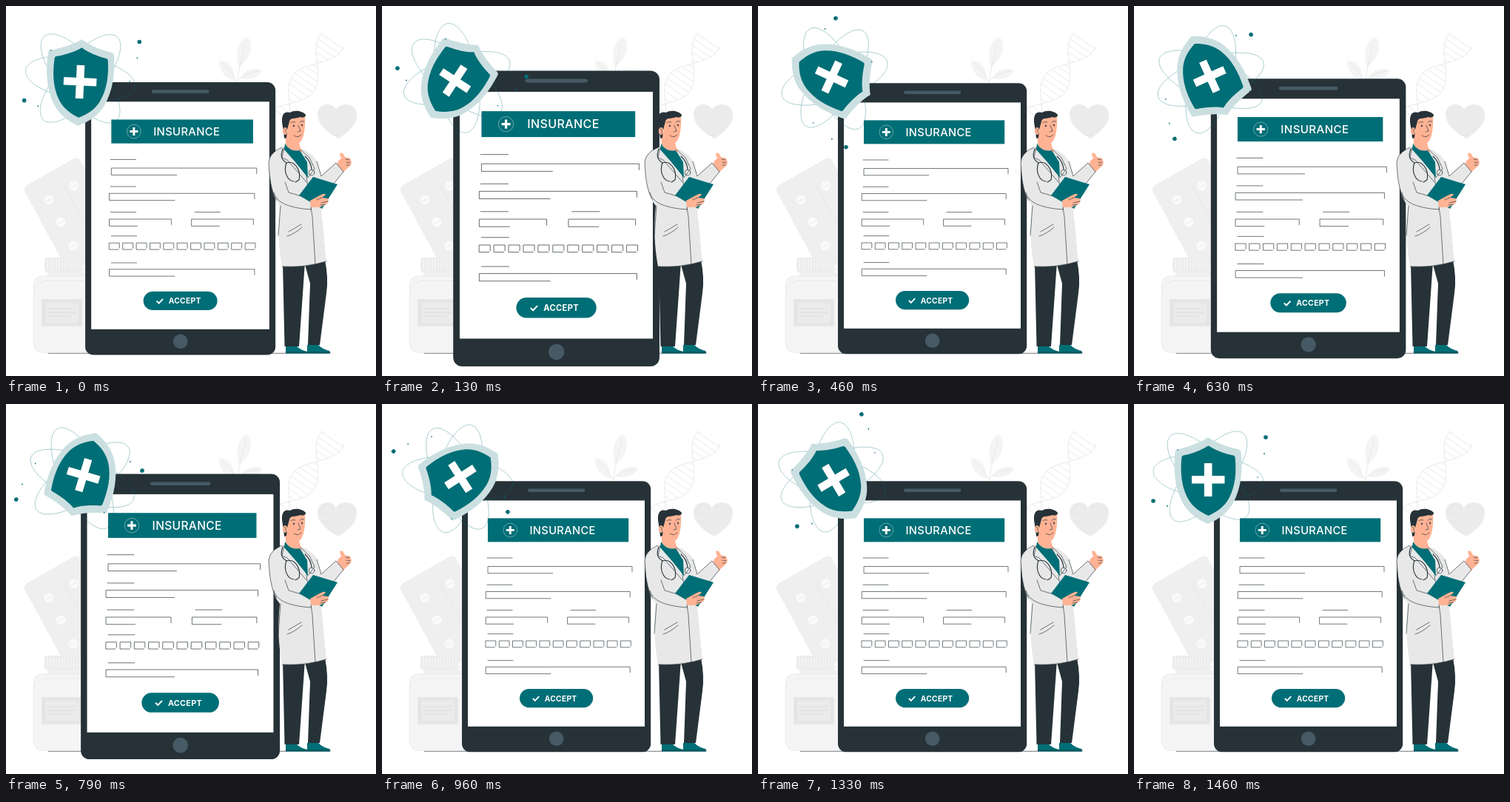
Write an HTML page that moves like this. It is 500 px wide and 500 px high and loops after 1500 ms.

```html
<!DOCTYPE html>
<html lang="en">
<head>
<meta charset="utf-8">
<title>Insurance form</title>
<style>
html, body { margin: 0; height: 100%; overflow: hidden; background: #fff }
svg { display: block; width: 100vw; height: 100vh }
text { font-family: Inter, Roboto, sans-serif; fill: #fff }
.teal { fill: #006e76 }
.dark { fill: #263238 }
.skin { fill: #ffb394 }
.coat { fill: #e8e8e8 }
.line { fill: none; stroke: #263238; stroke-width: .65; stroke-linecap: round }
.pale { fill: #efefef }
.faint { fill: none; stroke: #e4e4e4; stroke-width: .8 }
</style>
</head>
<body>
<svg viewBox="0 0 500 500">
  <path class="line" d="M57 469.3H438"/>

  <g id="blister">
    <path class="pale" d="M27 243L90 207Q97 203 101 210L150 300L112 372L80 352L25 250Q24 246 27 243Z"/>
    <path class="faint" d="M76 238L128 332"/>
  </g>

  <g id="bottle">
    <rect x="56" y="357" width="45" height="10" fill="#f0f0f0"/>
    <rect x="52" y="340" width="51" height="19" rx="3" fill="#ececec"/>
    <rect x="37.5" y="365" width="80" height="103" rx="11" fill="#f5f5f5" stroke="#e9e9e9"/>
    <path class="faint" d="M38 384Q42 372 56 371H106"/>
    <rect x="48" y="396" width="55" height="37" fill="#e6e6e6"/>
    <rect x="52" y="400" width="47" height="29" fill="#ebebeb" stroke="#dadada" stroke-width=".6"/>
    <path d="M56 409H95M56 414H95M56 419H88" stroke="#d8d8d8" stroke-width=".8"/>
  </g>

  <g id="leaves">
    <path fill="#f4f4f4" d="M315 82C309 66 314 46 325 42C335 45 334 70 315 82ZM309 101C296 97 287 86 288 75C299 70 310 84 309 101ZM317 98C321 87 334 82 346 87C342 97 328 101 317 98Z"/>
    <path class="faint" d="M325 46Q318 68 312 104M291 77Q304 86 311 102M343 88Q323 89 312 102"/>
  </g>

  <path id="dna" class="faint"/>
  <path fill="#ebebeb" d="M449 179C431 169 421 158 421 147C421 131 440 129 446 140C453 129 473 131 474 146C475 160 462 171 449 179Z"/>
  <path d="M422 154L441 155L446 141L452 158L461 152L473 150" fill="none" stroke="#f2f2f2"/>

  <g id="tablet">
    <rect class="dark" x="108" y="104.3" width="255.2" height="365.9" rx="11"/>
    <rect x="116" y="130.4" width="239" height="305.4" fill="#fff"/>
    <rect x="197" y="114.5" width="77.3" height="4.5" rx="2.2" fill="#455a64"/>
    <circle cx="235.7" cy="452.2" r="9.8" fill="#455a64"/>
    <rect class="teal" x="143" y="154.4" width="190.2" height="32"/>
    <circle cx="173.3" cy="170.4" r="9.3" fill="none" stroke="#fff" stroke-width=".7" opacity=".55"/>
    <path d="M167.8 170.4H178.8M173.3 164.9V175.9" stroke="#fff" stroke-width="2.9"/>
    <text x="199.5" y="175.7" font-size="14.7" font-weight="500" letter-spacing=".35">INSURANCE</text>
    <path id="fields" class="line"/>
    <rect class="teal" x="186" y="385" width="99.2" height="25.2" rx="12.6"/>
    <path d="M203.8 397.8L206.8 400.8L212.2 395.2" fill="none" stroke="#fff" stroke-width="1.9"/>
    <text x="219.8" y="401.5" font-size="10.2" font-weight="700" letter-spacing=".3">ACCEPT</text>
  </g>

  <g id="doctor">
    <path class="dark" d="M374 348L404 346L396 460H376.5ZM403 346L431 343Q436 368 433 388L424 458H408L411 375Z"/>
    <path class="teal" d="M378 460H393Q398 465 407 467V469.5H378ZM407 458H422Q428 464 437 466Q439 468 437 469.5H407Z"/>
    <path class="line" d="M378 468H407M407 468H438"/>
    <path class="skin" d="M448 221C446 213 449 208 453 206L451 200Q452 197 455 199L459 205Q465 204 466 208Q468 214 464 217Q458 222 455 226Z"/>
    <path class="line" d="M459 207L464 208M460 211L465 212M460 215L464 215"/>
    <path class="coat" d="M408 199Q416 201 420 210L426 230L446 212L456 224L437 248L418 252Z"/>
    <path class="line" d="M420 210L426 230L446 212L456 224L438 246"/>
    <path class="coat" d="M376 190C365 195 356 200 355 211C356 232 358 248 365 263L370 270C367 300 368 325 373 352Q404 354 433 345C430 320 428 285 424 262L421 222C420 207 414 199 402 194Z"/>
    <path class="line" d="M373 191Q357 197 355 211C356 232 358 250 366 263M373 352Q403 354 433 345M405 224L414 285L418 349M380 311Q390 308 400 299M382 305L399 295M371 270L368 310"/>
    <path class="skin" d="M377 168L378 190L391 205L400 197L394 180Z"/>
    <path class="teal" d="M377 186Q384 198 397 195L407 211L408 232L391 211L376 194Z"/>
    <path class="skin" d="M379 154C379 172 384 186 391 187C401 187 405 170 404 149H381Z"/>
    <path class="dark" d="M376 179C375 163 371 155 374 148C376 143 380 143 384 144C390 140 401 142 405 147C405 151 400 151 398 150C391 153 384 150 383 156L380 167L379 178Z"/>
    <ellipse class="skin" cx="377" cy="169" rx="3.2" ry="5"/>
    <path class="line" d="M385 158Q388 155 391 157M397 157Q400 154 403 156M395 161L398 169L394 170M389 175Q394 179 399 174M376 166Q379 167 378 171"/>
    <ellipse class="dark" cx="389" cy="162" rx=".9" ry="1.4"/>
    <ellipse class="dark" cx="400" cy="161" rx=".9" ry="1.4"/>
    <path class="line" stroke-linejoin="round" d="M376 191L373 205L380 208L406 238M398 194L410 205L417 220L408 232"/>
    <path class="line" style="stroke-width:1.1" d="M374 193C370 204 373 208 379 212C375 222 379 236 389 237M379 212C390 208 399 222 396 235L391 238M404 203Q412 210 413 221"/>
    <circle cx="413" cy="225" r="3.8" class="line"/>
    <path class="coat" d="M359 229L366 263Q372 273 412 275L413 261L382 252L377 238Z"/>
    <path class="line" d="M362 252Q366 272 412 275L413 261L382 252L377 238"/>
    <path class="teal" d="M415 231L448 241L427 274L396 256Z"/>
    <path class="skin" d="M411 263L424 256Q431 252 432 255L427 259L435 260Q437 263 434 267L424 272L412 272Z"/>
    <path class="line" d="M427 259L420 262M435 264L426 266M432 268L425 269"/>
  </g>

  <g id="shield">
    <g id="orbits" fill="none" stroke="#006e76" stroke-width=".5" opacity=".6"></g>
  </g>
</svg>
<script>
const $ = id => document.getElementById(id);
const add = (parent, tag, attrs) => {
  const node = document.createElementNS('http://www.w3.org/2000/svg', tag);
  for (const key in attrs) node.setAttribute(key, attrs[key]);
  return parent.appendChild(node);
};

// Shield: pale crest, smaller teal core, cross, and the atom around it
const crest = 'M100 45C90 52 74 58 58 61.5Q55.6 62 55.4 65C53 90 55 112 65 132C73 148 88 157 100 162' +
  'C112 157 127 148 135 132C145 112 147 90 144.6 65Q144.4 62 142 61.5C126 58 110 52 100 45Z';
const shield = $('shield');
add(shield, 'path', { d: crest, fill: '#cbdfe1' });
add(shield, 'path', { d: crest, class: 'teal', transform: 'translate(19.5 19.7) scale(.81)' });
add(shield, 'path', { d: 'M78 102.3H122.5M100.2 80V125', stroke: '#fff', 'stroke-width': 10.6 });

for (const angle of [6, 47, -51])
  add($('orbits'), 'ellipse', { rx: 75, ry: 29, transform: `translate(100.5 98) rotate(${angle})` });
for (const [cx, cy, r] of [[178, 45, 2.8], [26, 131, 2.8], [176, 67, .9], [45, 138, .9], [167, 99, .8], [59, 62, .8]])
  add(shield, 'circle', { cx, cy, r, class: 'teal' });

for (const [x, y] of [[58, 262], [92, 243], [74, 292], [91, 324], [108, 355]]) {
  add($('blister'), 'circle', { cx: x, cy: y, r: 6.5, fill: '#fafafa' });
  add($('blister'), 'path', { d: `M${x - 4} ${y + 2}L${x + 4} ${y - 2}`, class: 'faint' });
}
for (let x = 56; x < 102; x += 4)
  add($('bottle'), 'path', { d: `M${x} 342V357`, stroke: '#f8f8f8' });

// Two crossing strands with rungs
const helix = (d, side) => {
  const sway = side * 18 * Math.sin(Math.PI * d / 66);
  return `${383 + .565 * d + .825 * sway} ${132 - .825 * d + .565 * sway}`;
};
let dna = '';
for (const side of [-1, 1])
  for (let d = -22; d <= 106; d += 2) dna += (d > -22 ? 'L' : 'M') + helix(d, side);
for (let d = -18; d < 104; d += 8) dna += `M${helix(d, -1)}L${helix(d, 1)}`;
$('dna').setAttribute('d', dna);

// Open boxes and label rules of the form
const box = (x, y, w, h = 9.3, drawn = .45) =>
  `M${x + w * drawn} ${y + h}H${x}V${y}H${x + w}V${y + h * .8}`;
const label = (x, y) => `M${x} ${y}H${x + 34}`;
let form = box(143, 219.5, 195) + box(140.2, 253.5, 195) + box(140.2, 288, 83.5) +
  box(250.6, 288, 83) + box(140.2, 355.3, 195) +
  label(142, 208) + label(142, 244.3) + label(142, 278.6) + label(255, 278.6) +
  label(143, 310.6) + label(143, 346.6);
for (let i = 0; i < 11; i++) form += box(140 + i * 18.25, 320, 13.8, 8.8, .9);
$('fields').setAttribute('d', form);

const LOOP = 1500, FRAMES = 36;
const beat = [[0, 1], [150, 1.1], [450, 1], [600, 1], [750, 1.1], [900, 1], [LOOP, 1]];

function scaleAt(t) {
  const i = beat.findIndex(([end]) => t < end || end === LOOP);
  const [t0, s0] = beat[i - 1], [t1, s1] = beat[i];
  return s0 + (s1 - s0) * (t - t0) / (t1 - t0);
}

// Runs in 24 steps a second; the last step completes the turn
function draw(now) {
  const step = Math.floor((now % LOOP + 5) / LOOP * FRAMES) % FRAMES;
  const t = (step + .25) / (FRAMES - .75) * LOOP;
  $('tablet').setAttribute('transform',
    `translate(235.7 287.3) scale(${scaleAt(t)}) translate(-235.7 -287.3)`);
  shield.setAttribute('transform', `rotate(${t / LOOP * 360} 102 99)`);
}

const start = performance.now();
function tick() {
  draw(performance.now() - start);
  requestAnimationFrame(tick);
}
tick();
</script>
</body>
</html>
```
